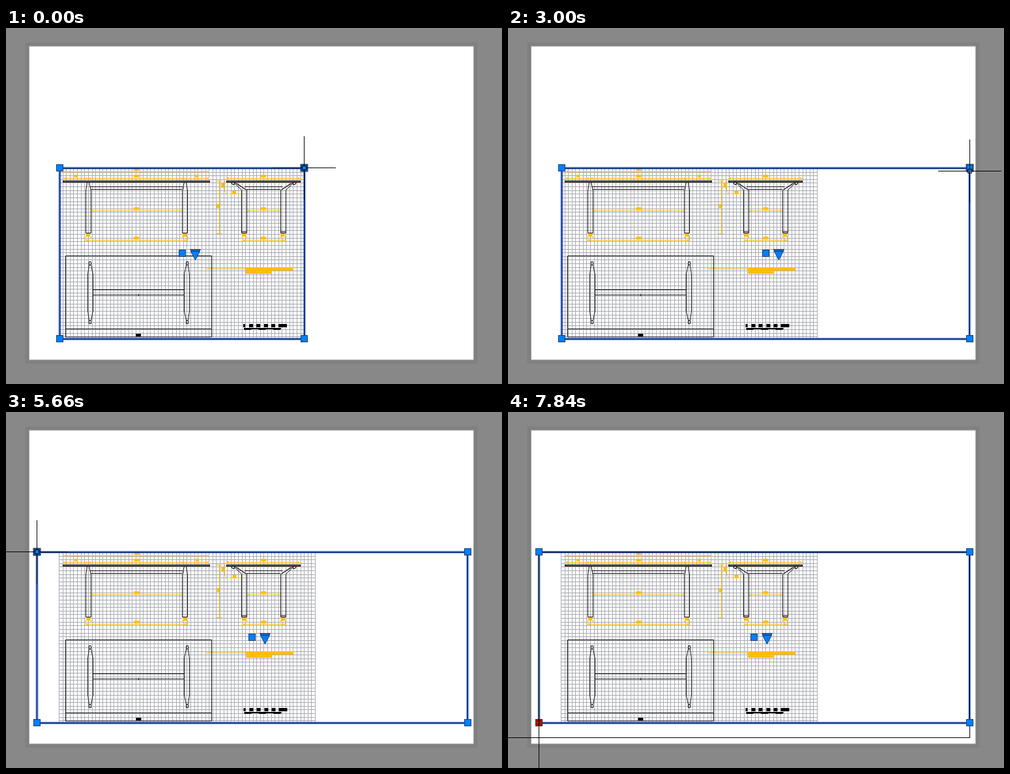
An HTML page for the animation above (7.99 s loop, 761 px wide and 546 px high).

```html
<!DOCTYPE html>
<html lang="en">
<head>
<meta charset="utf-8">
<title>Viewport stretch</title>
<style>
html, body { margin: 0; width: 100%; height: 100%; overflow: hidden; background: #888; }
svg { display: block; }
text { font: 11.2px "Open Sans", "Noto Sans", sans-serif; fill: #666; white-space: pre; }
.grid { stroke: #a9abb2; shape-rendering: crispEdges; }
.ink { fill: none; stroke: #111; }
.dim { fill: none; stroke: #ffbf00; }
.tag { fill: #ffbf00; }
.glow { fill: none; stroke: #4a82f5; stroke-opacity: .42; stroke-width: 5; }
.edge { fill: none; stroke: #0b2a7c; stroke-width: 2; }
.rubber { fill: none; stroke: #000; }
.track { stroke: #e3a21a; stroke-dasharray: 13 5; }
.grip { fill: #007fff; stroke: #1d3c66; }
.grip.hover { stroke: #1f3f6c; stroke-width: 2; }
.grip.hot { fill: #b00000; stroke: #5c0d0d; }
.snap { fill: none; stroke: #129012; stroke-width: 2; }
.cross { stroke: #000; fill: none; }
.tip rect { fill: #fff; stroke: #dcdcdc; }
.tip .picked { fill: #0078d7; stroke: none; }
.tip .white { fill: #fff; }
</style>
</head>
<body>
<svg width="761" height="546" viewBox="0 0 761 546">
  <defs>
    <clipPath id="view"><rect id="clip" y="215" height="262"/></clipPath>
    <marker id="arrow" viewBox="0 0 4 3" refX="4" refY="1.5" markerWidth="4" markerHeight="3" orient="auto-start-reverse">
      <path d="M0 0L4 1.500L0 3Z" fill="#ffbf00"/>
    </marker>
    <path id="leg" d="M-76 236.500L-78 250V314.500H-70V250L-73 236.500"/>
    <g id="bracket">
      <path d="M-50 237.500Q-47 242 -44 239L-34 248.500V314.500H-26V248.500L-45 237M-41 238.500L-28 248M-34 312.500H-26"/>
      <circle cx="-47" cy="238" r="2"/>
    </g>
    <path id="post" d="M-76 358.500H-73V363.500H-76ZM-76 363.500L-78 378V434L-76 448.500H-73L-70 434V378L-73 363.500M-76 448.500V453.500H-73V448.500"/>
  </defs>

  <rect x="29.500" y="22" width="694" height="493" fill="#808080"/>
  <rect x="35.500" y="28" width="682" height="481" fill="#fff" stroke="#a6a6a6"/>

  <g clip-path="url(#view)">
    <path id="grid" class="grid"/>
    <g id="dims" class="dim">
      <path d="M327.500 234V315M335.500 234V250L339 254.500H362M323 234.500H331M323 315.500H331M306 369.500H440"/>
    </g>
    <g class="ink">
      <rect x="87.500" y="234.500" width="225" height="2" fill="#777"/>
      <rect x="338.500" y="234.500" width="113" height="2" fill="#777"/>
      <path d="M129 243.500H271M130 247.500H270M366 243.500H424M369 247.500H421"/>
      <path d="M91.500 349.500H315.500V474H91.500ZM91 461.500H316M133 401.500H273M133 409.500H273M203.500 408V411"/>
    </g>
    <g id="pairs" class="ink"></g>
    <g id="tags" class="tag"></g>
    <g id="notes"></g>
  </g>

  <rect id="glow" class="glow"/>
  <rect id="edge" class="edge"/>
  <rect id="rubber" class="rubber"/>
  <line id="track" class="track"/>
  <g id="grips"></g>
  <g id="center">
    <rect class="grip" x="-4.500" y="340.500" width="10" height="10"/>
    <path class="grip" d="M12.500 339.500H28.500L27 342H14ZM13.500 342.500H27.500L20.500 356Z"/>
  </g>
  <rect id="snap" class="snap" x="-5" y="-5" width="11" height="11"/>
  <path id="mark" d="M-4 .5H5M.5 -4V5" stroke="#3f7d22"/>
  <g id="cross" class="cross">
    <path id="hairs" d="M-48 .5H49M.5 -48V49"/>
    <path id="picker" d="M-48 .5H-2.500V-2.500H3.500V3.500H-2.500V.5M3.500 .5H49M.5 -48V-2.500M.5 3.500V49"/>
  </g>
  <g id="ortho" class="tip">
    <rect id="orthoBox" x=".5" y=".5" height="19"/>
    <text id="orthoText" x="2" y="14"></text>
  </g>
  <g id="prompt" class="tip">
    <rect x=".5" y=".5" width="160" height="22"/>
    <text x="5" y="14">Specify stretch point or</text>
    <path d="M146.500 7.500H156.500V17.500H146.500ZM151.500 9V14M149 12L151.500 14.500L154 12M149 15.500H154" fill="none" stroke="#555"/>
    <rect x="164.500" y=".5" width="46" height="19"/>
    <rect class="picked" x="166" y="2" width="33" height="16"/>
    <text class="white" x="166" y="14">0.0000</text>
    <rect x="214.500" y=".5" width="35" height="19"/>
    <text x="217" y="14">&lt; 0°</text>
  </g>
</svg>
<script>
const LOOP = 7990, TOP = 214, BOTTOM = 476, CELL = 5.614, UNIT = 93.3974 / 152;
const $ = id => document.getElementById(id);
const set = (el, attrs) => { for (const k in attrs) el.setAttribute(k, attrs[k]); };
const show = (el, on) => { el.style.display = on ? '' : 'none'; };
const move = (el, x, y) => el.setAttribute('transform', `translate(${x} ${y})`);
const add = (parent, tag, attrs) => {
  const el = document.createElementNS('http://www.w3.org/2000/svg', tag);
  set(el, attrs);
  return parent.appendChild(el);
};
const block = (parent, x, y, width, height) => add(parent, 'rect', { x, y, width, height });

// Grid lines snap to whole pixels.
let grid = '';
for (let i = 0; i <= 70; i++) {
  const at = Math.round(i * CELL) + .5;
  grid += `M${81 + at} 215V477`;
  if (at < 262) grid += `M81 ${215 + at}H474.500`;
}
$('grid').setAttribute('d', grid);

// A dimension carries its greeked label at the middle.
function dim(x0, x1, y, label = 8) {
  add($('dims'), 'path', {
    d: `M${x0} ${y + .5}H${x1}`, 'marker-start': 'url(#arrow)', 'marker-end': 'url(#arrow)'
  });
  block($('tags'), (x0 + x1 - label) / 2, y - 5, label, 4);
}

// Both elevations are symmetric: half widths of top, inner and outer leg faces.
function elevation(c, top, inner, outer) {
  dim(c - inner, c + inner, 280);
  dim(c - outer, c + outer, 325);
  for (const side of [-1, 1]) {
    block($('tags'), c + side * (inner + outer) / 2 - 3, 315, 6, 5);
    for (const edge of [inner, outer])
      add($('dims'), 'path', { d: `M${c + side * edge + .5} 319V${edge === outer ? 327 : 322}` });
  }
}
elevation(200, 112, 70, 78);
elevation(395, 56, 26, 33);
dim(88, 312, 220);
dim(88, 126, 230, 5);
dim(126, 274, 230);
dim(274, 312, 230, 5);
dim(338, 452, 230);
block($('tags'), 347, 250, 6, 4);
block($('tags'), 330, 237, 4, 8);
block($('tags'), 323, 270, 4, 6);
block($('tags'), 368, 367, 73, 5);
block($('tags'), 368, 371, 40, 6);

for (const [part, c] of [['leg', 200.5], ['bracket', 395.5], ['post', 203.5]])
  for (const flip of [1, -1])
    add($('pairs'), 'use', { href: '#' + part, transform: `translate(${c} 0) scale(${flip} 1)` });

// Scale bar with two grid cells per unit, and the title.
for (let i = 0; i < 6; i++) {
  const x = 365.5 + i * 2 * CELL, width = i === 0 ? 3 : i === 5 ? 13 : 6;
  block($('notes'), Math.floor(x - Math.min(width, 6) / 2), 454, width, 5);
  if (i % 2 === 0) block($('notes'), x - .5, 461, 11, 2);
}
block($('notes'), 365, 460, 57, 2);
block($('notes'), 199, 469, 8, 4);

const grips = [0, 1, 2, 3].map(() => add($('grips'), 'rect', { width: 10, height: 10 }));

const easeOut = p => u => 1 - (1 - u) ** p;
const smooth = u => u * u * (3 - 2 * u);

// Cursor moves: start, end, screen refreshes, start point, end point, easing.
const moves = [
  [430, 1360, 8, [457, 214], [672, 216], easeOut(2.25)],
  [1480, 2440, 8, [672, 216], [708, 219], easeOut(2)],
  [3000, 3970, 8, [708, 219], [82, 214], smooth],
  [4250, 5210, 8, [82, 214], [47, 213], easeOut(2)],
  [5660, 6350, 6, [47, 214], [47, 476], smooth],
  [6660, 7290, 6, [46, 476], [46, 496], easeOut(1.45)],
  [7570, 7840, 3, [47, 497], [47, 499], easeOut(1)]
];

// Grip drags: start, end, corner, and when the distance is shown.
const drags = [
  { from: 430, to: 3000, corner: 1, ortho: [820, 3000] },
  { from: 4250, to: 5660, corner: 0, ortho: [5360, 5660] },
  { from: 6660, to: LOOP, corner: 2, ortho: [7290, 7570] }
];
const PROMPT = 390;

// Refreshes are evenly spread, on a 30 ms clock.
function progress(t, t0, t1, count) {
  let shown = 0;
  for (let k = 1; k < count; k++) {
    const tick = 30 * Math.floor(k * (t1 - t0) / (count - 1) / 30);
    if (t0 + tick <= t) shown = tick;
  }
  return Math.min(1, shown / (t1 - t0));
}

function cursorAt(t) {
  const m = moves.filter(m => m[0] <= t).pop();
  if (!m) return moves[0][3];
  const [t0, t1, count, a, b, ease] = m;
  const u = ease(progress(t, t0, t1, count));
  return a.map((v, i) => Math.round(v + (b[i] - v) * u));
}

function draw(t) {
  const [cx, cy] = cursorAt(t);
  const left = t < 5660 ? 82 : 47, right = t < 3000 ? 457.4 : 707.6;
  const gripRight = Math.round(right);
  const corners = [[left, TOP], [gripRight, TOP], [left, BOTTOM], [gripRight, BOTTOM]];
  const drag = drags.find(d => t >= d.from && t < d.to);
  const hot = drag ? drag.corner : -1;

  set($('clip'), { x: left, width: right - left + 1 });
  const frame = { x: left + .5, y: TOP + 1, width: right - left, height: BOTTOM - TOP };
  set($('glow'), frame);
  set($('edge'), frame);
  const shift = t < 3000 ? 0 : .5;
  move($('tags'), shift, 0);
  move($('notes'), shift, 0);
  move($('center'), Math.round((left + right) / 2), 0);

  corners.forEach(([x, y], i) => {
    const hover = !drag && Math.abs(x - cx) < 6 && Math.abs(y - cy) < 6;
    set(grips[i], { x: x - 4.5, y: y - 4.5, class: 'grip' + (i === hot ? ' hot' : hover ? ' hover' : '') });
  });

  const prompt = drag && t < drag.from + PROMPT;
  const ortho = drag && t >= drag.ortho[0] && t < drag.ortho[1];
  show($('rubber'), drag);
  show($('track'), ortho);
  show($('snap'), prompt);
  show($('mark'), hot === 2);
  show($('hairs'), drag);
  show($('picker'), !drag);
  show($('prompt'), prompt);
  show($('ortho'), ortho);
  move($('cross'), cx, cy);

  if (!drag) return;
  const [hx, hy] = corners[hot];
  const down = hot === 2;
  const x0 = hot === 0 ? cx : left, x1 = hot === 1 ? cx : gripRight, y1 = down ? cy : BOTTOM;
  set($('rubber'), { x: x0 + .5, y: TOP + .5, width: Math.max(0, x1 - x0), height: y1 - TOP });
  set($('track'), { x1: hx + .5, y1: hy + .5, x2: (down ? hx : cx) + .5, y2: (down ? cy : hy) + .5 });
  move($('snap'), hx, hy);
  move($('mark'), hx, hy);
  move($('prompt'), cx + 16, cy + 17);

  if (ortho) {
    const length = UNIT * Math.abs(down ? cy - hy : cx - hx);
    $('orthoText').textContent = `Ortho: ${length.toFixed(4)} < ${[180, 0, 270][hot]}°`;
    set($('orthoBox'), { width: Math.round($('orthoText').getComputedTextLength()) + 13 });
    move($('ortho'), cx + (t < 1480 ? 18 : 15), cy + 17);
  }
}

function loop() {
  draw(performance.now() % LOOP);
  requestAnimationFrame(loop);
}
loop();
</script>
</body>
</html>
```
